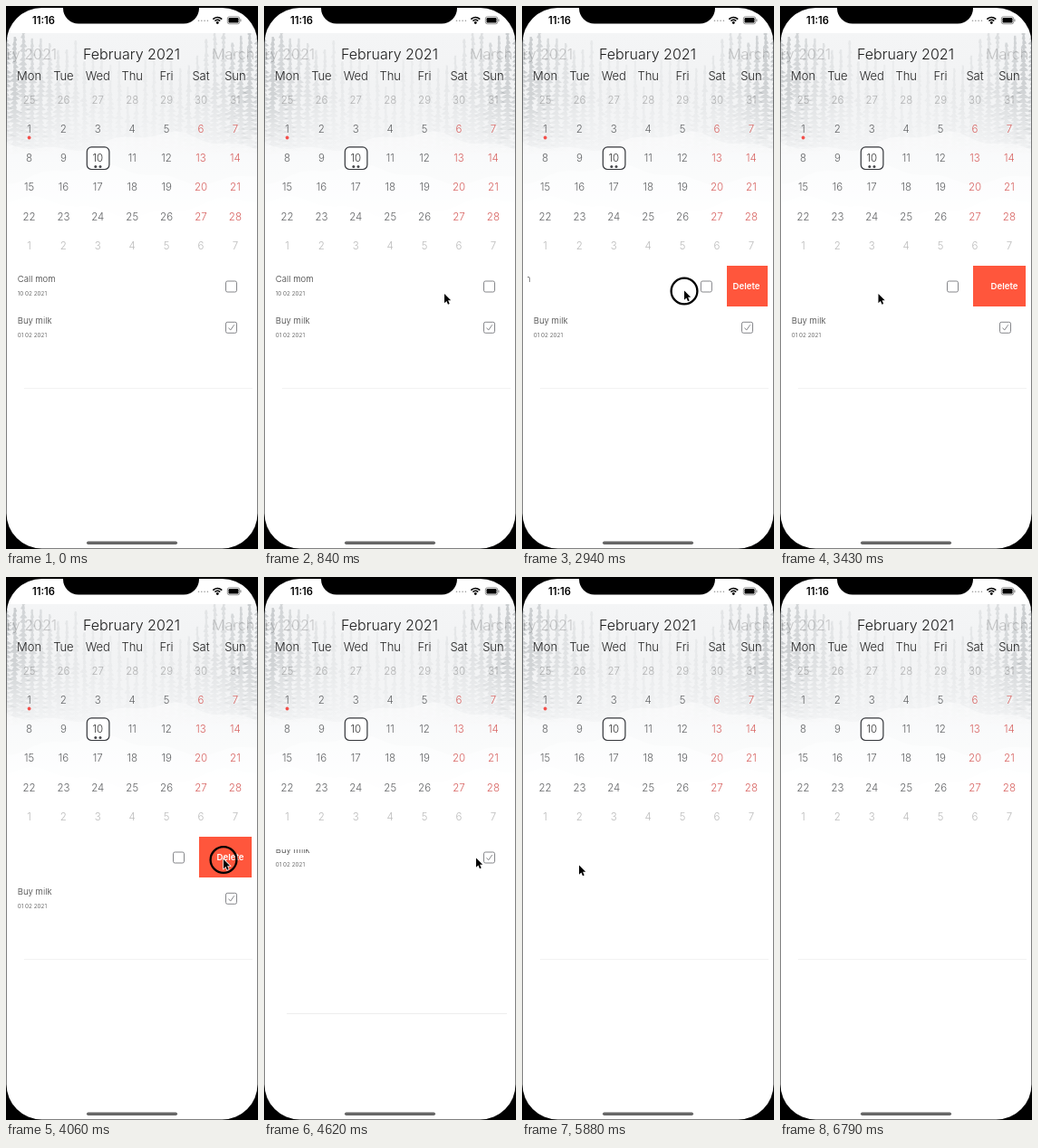
An HTML page with a canvas for the animation above (7350 ms loop, 278x600 px).

```html
<!DOCTYPE html>
<html lang="en">
<head>
<meta charset="utf-8">
<title>Calendar tasks</title>
<style>
  html, body { margin: 0; width: 100%; height: 100%; overflow: hidden; background: #000; }
  canvas { display: block; width: 278px; height: 600px; }
</style>
</head>
<body>
<canvas id="stage"></canvas>
<script>
const W = 278, H = 600, LOOP = 7350, STEP = 70;
const ROW = 45.3, ROW_RIGHT = 271, OPEN = 58, DRAG = 0.64;
const REST_X = 249.5, DELETE_X = 240;

// Moments of the story, in ms
const T = {
  enter: 350, grab: 2660, drop: 3220, settled: 3430, tap: 4060, removed: 4200,
  regrab: 5150, redrop: 5700, cleared: 5880, gone: 5950
};

// Pointer moves, each eased from where the last one ended
const MOVES = [
  { from: T.enter, to: 840, x: 199, y: 318 },
  { from: 1610, to: 2030, x: REST_X, y: 311 },
  { from: T.grab, to: T.drop, x: 108.5, y: 318 },
  { from: T.settled, to: T.tap, x: DELETE_X, y: 312 },
  { from: T.removed, to: 4480, x: 234, y: 310.5 },
  { from: 4830, to: 5040, x: DELETE_X, y: 314 },
  { from: T.regrab, to: 5600, x: 63, y: 318.5 }
];

const ARROW = new Path2D('M0 0V10.2L2.4 8L4 11.8L5.7 11L4.1 7.3L7.2 7.2Z');

const canvas = document.getElementById('stage');
const g = canvas.getContext('2d');
const scale = window.devicePixelRatio || 1;
canvas.width = W * scale;
canvas.height = H * scale;

const clamp = v => Math.max(0, Math.min(1, v));
const mix = (a, b, k) => a + (b - a) * k;
const between = (t, from, to) => t >= from && t < to;

function progress(t, from, to) {
  const v = clamp((t - from) / (to - from));
  return v * v * (3 - 2 * v);
}

function pointer(t) {
  let x = W, y = 420;
  for (const move of MOVES) {
    const k = progress(t, move.from, move.to);
    x = mix(x, move.x, k);
    y = mix(y, move.y, k);
  }
  return { x, y };
}

function text(str, x, y, size, color, weight = 300, align = 'center') {
  g.font = `${weight} ${size}px Inter, Roboto, sans-serif`;
  g.textAlign = align;
  g.fillStyle = color;
  g.fillText(str, x, y + size * 0.36);
}

function rect(x, y, w, h, color) {
  g.fillStyle = color;
  g.fillRect(x, y, w, h);
}

function round(x, y, w, h, r, fill, stroke, width = 1) {
  g.beginPath();
  g.roundRect(x, y, w, h, r);
  paint(fill, stroke, width);
}

function circle(x, y, r, fill, stroke, width) {
  g.beginPath();
  g.arc(x, y, r, 0, Math.PI * 2);
  paint(fill, stroke, width);
}

function paint(fill, stroke, width) {
  if (fill) {
    g.fillStyle = fill;
    g.fill();
  }
  if (stroke) {
    g.strokeStyle = stroke;
    g.lineWidth = width;
    g.stroke();
  }
}

function clipTo(x, y, w, h) {
  g.beginPath();
  g.rect(x, y, w, h);
  g.clip();
}

function fade(y0, y1, ...colors) {
  const gradient = g.createLinearGradient(0, y0, 0, y1);
  colors.forEach((color, i) => gradient.addColorStop(i / (colors.length - 1), color));
  return gradient;
}

function randomizer(seed) {
  return () => (seed = (seed * 16807) % 2147483647) / 2147483647;
}

function conifer(x, top, bottom, width, alpha, rnd) {
  const tone = a => `rgba(70,80,86,${a})`;
  const edge = side => {
    for (let y = top; y < bottom; y += 5) {
      const k = (y - top) / (bottom - top);
      g.lineTo(x + side, y);
      g.lineTo(x + side * width * (0.2 + 0.8 * k) * (0.3 + 0.7 * rnd()), y + 4);
    }
  };
  g.beginPath();
  g.moveTo(x, top);
  edge(1);
  g.lineTo(x, bottom);
  g.lineTo(x, top);
  edge(-1);
  g.lineTo(x, bottom);
  paint(fade(top, bottom, tone(alpha), tone(alpha * 0.8), tone(0)));
}

function landscape() {
  const rnd = randomizer(77);
  g.save();
  clipTo(0, 30, W, 240);
  rect(0, 30, W, 240, fade(30, 265, '#f4f5f6', '#f2f3f4', '#f4f5f6', '#f7f8f9', '#fff'));

  // Trees grow taller and darker towards both sides
  for (let i = 0; i < 30; i++) {
    const x = i * 9.6, side = Math.abs(x / 139 - 1);
    const top = 80 - 65 * side + 30 * (rnd() - 0.5);
    conifer(x, top, 165, 8 + 6 * side, 0.05 + 0.24 * side ** 3, rnd);
  }

  // Rolling snow
  for (let i = 0; i < 3; i++) {
    g.beginPath();
    g.moveTo(0, 270);
    for (let x = 0; x <= W; x += 6) {
      g.lineTo(x, 150 + i * 36 + 9 * Math.sin(x / 37 + i * 2) + 3 * Math.sin(x / 11 + i));
    }
    g.lineTo(W, 270);
    paint('rgba(255,255,255,.4)');
  }
  g.restore();
}

function calendar(t) {
  const pale = 'rgba(60,60,60,.24)';
  text('January 2021', 56, 53.5, 16, pale, 300, 'right');
  text('February 2021', 138.5, 53.5, 16, '#1c1c1c');
  text('March 2021', 227, 53.5, 16, pale, 300, 'left');

  const colX = i => 25.5 + i * 37.9;
  ['Mon', 'Tue', 'Wed', 'Thu', 'Fri', 'Sat', 'Sun']
    .forEach((day, i) => text(day, colX(i), 77.5, 13, '#222'));

  round(89.3, 155.9, 24.6, 24.6, 5, '#fff', '#34363b', 1.2);

  for (let i = 0; i < 42; i++) {
    const date = new Date(2021, 0, 25 + i);
    const day = date.getDate();
    const color = date.getMonth() !== 1 ? 'rgba(90,90,90,.42)'
      : day === 10 ? '#333' : i % 7 > 4 ? '#d7605e' : '#606264';
    text(day, colX(i % 7), 104 + Math.floor(i / 7) * 32.1, 11.5, color);
  }

  if (t <= T.removed) [98.8, 104].forEach(x => circle(x, 177.4, 1.5, '#45464a'));
  if (t < T.gone) circle(25.6, 145.5, 1.9, '#f4504c');
}

function task(title, date, y, shift, checked) {
  const gray = '#85868a', x = 248.5 - shift;
  g.save();
  clipTo(6, y - 23, ROW_RIGHT - 6, 45);
  text(title, 12.7 - shift, y - 8, 9.6, '#3c3c3c', 300, 'left');
  text(date, 12.7 - shift, y + 8, 6.4, '#444', 300, 'left');
  g.globalAlpha = clamp(1 - (shift - OPEN) / 130);
  round(x - 6, y - 6, 12, 12, 1.8, null, gray);
  if (checked) {
    g.beginPath();
    g.moveTo(x - 3, y + 0.3);
    g.lineTo(x - 0.8, y + 2.8);
    g.lineTo(x + 3.2, y - 3);
    paint(null, gray, 1);
  }
  g.globalAlpha = 1;
  clipTo(ROW_RIGHT - shift, y - 23, shift, 45);
  rect(0, y - 23, W, 45, '#ff563c');
  text('Delete', 247.5, y, 9.6, '#fff', 600);
  g.restore();
}

// How far a row is pulled: it follows the pointer, then eases to its end
function swipe(t, grab, drop, done, startX, end) {
  if (t < grab) return 0;
  const pulled = Math.max(0, startX - pointer(Math.min(t, drop)).x) * DRAG;
  return mix(pulled, end, progress(t, drop, done));
}

function tasks(t) {
  const first = 310, relayout = between(t, 4550, 4700);

  if (t < T.removed) {
    const shift = swipe(t, T.grab, T.drop, T.settled, REST_X, OPEN);
    task('Call mom', '10 02 2021', first, shift, false);
  }
  if (t < T.cleared) {
    const shift = swipe(t, T.regrab, T.redrop, T.cleared, DELETE_X, 265);
    const y = first + ROW * (1 - progress(t, T.removed, 4500));
    g.save();
    if (relayout) clipTo(0, 301, W, 200);
    task('Buy milk', '01 02 2021', y, shift, true);
    g.restore();
  }

  if (relayout) rect(25, 482, 243, 1, '#eee');
  else rect(20, 422, 252, 1, '#f2f2f2');
}

function phone() {
  g.beginPath();
  g.rect(0, 0, W, H);
  g.roundRect(0.5, 2, W - 1, H - 2.5, 39);
  g.fillStyle = '#000';
  g.fill('evenodd');
  round(63, -20, 150, 39.5, 17, '#000');

  text('11:16', 41.5, 16, 11.2, '#000', 600);
  for (let i = 0; i < 4; i++) circle(212.5 + i * 3.3, 16.3, 0.8, '#999');

  for (const r of [4, 6.8]) {
    g.beginPath();
    g.arc(233.3, 19.3, r, -Math.PI * 0.76, -Math.PI * 0.24);
    paint(null, '#000', 1.6);
  }
  circle(233.3, 18.5, 1.4, '#000');

  round(244.3, 11.8, 13.4, 8, 2.2, null, '#777', 0.8);
  round(245.5, 13, 11, 5.6, 1.2, '#000');
  rect(258.4, 14.4, 1, 2.8, '#777');
  round(89, 591.6, 100, 3.4, 1.7, '#666');
}

function drawPointer(t) {
  if (!between(t, T.enter, T.gone)) return;
  const { x, y } = pointer(t);
  const pressed = between(t, T.grab, T.drop) || between(t, T.tap, T.removed)
    || between(t, T.regrab, T.redrop);
  if (pressed) circle(x, y + 0.5, 14.4, null, '#000', 2.3);
  g.save();
  g.translate(x, y);
  g.strokeStyle = '#fff';
  g.lineWidth = 1.4;
  g.stroke(ARROW);
  g.fillStyle = '#000';
  g.fill(ARROW);
  g.restore();
}

function frame(now) {
  const t = Math.floor((now % LOOP) / STEP) * STEP;
  g.setTransform(scale, 0, 0, scale, 0, 0);
  rect(0, 0, W, H, '#fff');
  landscape();
  calendar(t);
  tasks(t);
  phone();
  drawPointer(t);
  requestAnimationFrame(frame);
}
requestAnimationFrame(frame);
</script>
</body>
</html>
```
